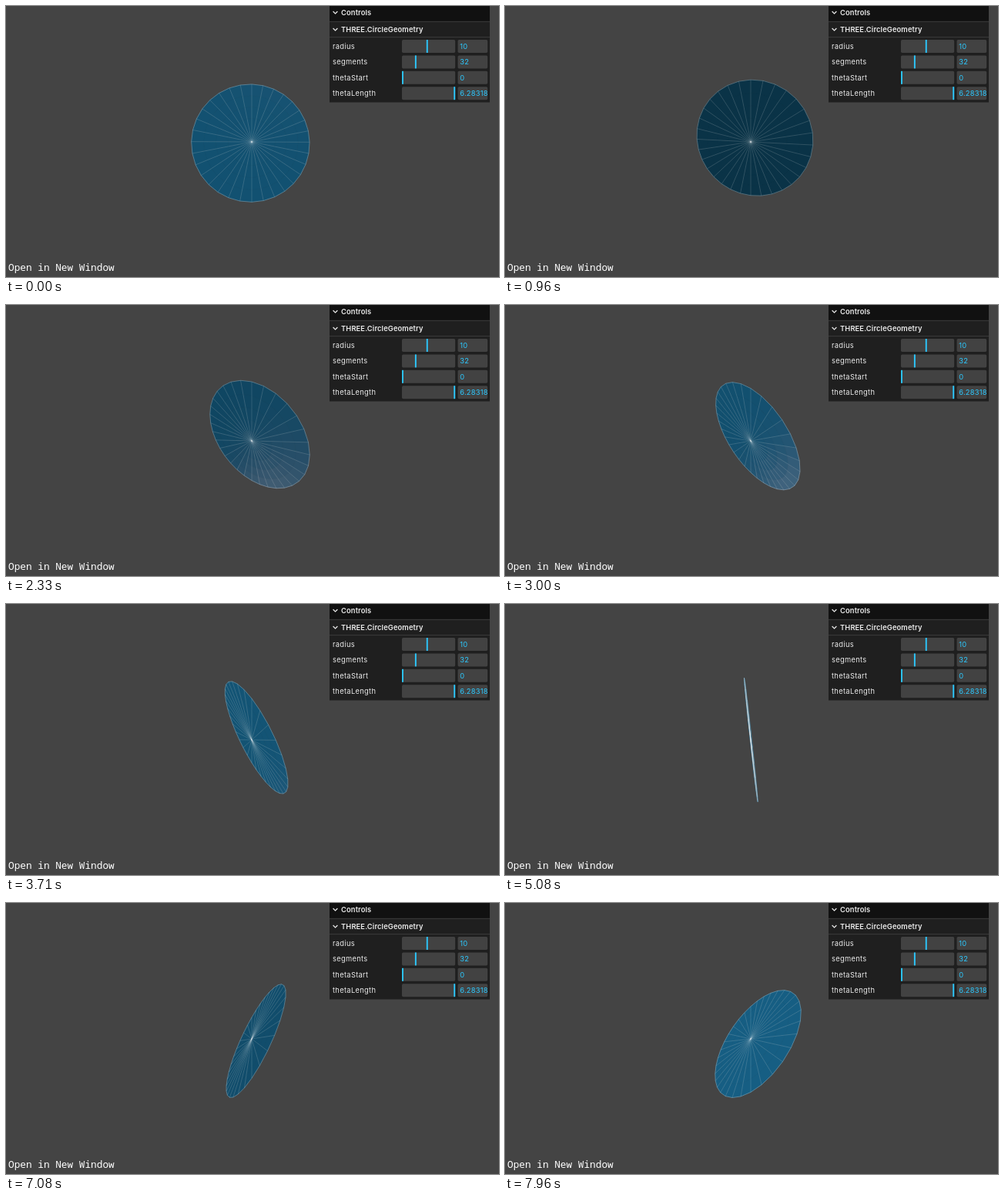
Write an HTML page that moves like this. It is 640 px wide and 353 px high and loops after 8000 ms.

```html
<!DOCTYPE html>
<html lang="en">
<head>
<meta charset="utf-8">
<title>CircleGeometry</title>
<style>
  html, body { margin: 0; width: 100%; height: 100%; overflow: hidden; background: #444; }
  svg { display: block; width: 100vw; height: 100vh; }
  #gui { font: 9.35px Inter, Roboto, sans-serif; letter-spacing: .3px; fill: #ebebeb; }
  #gui .title { font-weight: 600; letter-spacing: .12px; }
  #gui .value { fill: #2cc9ff; letter-spacing: .2px; }
  #link { font: 12.75px "Noto Sans Mono", "DejaVu Sans Mono", monospace; fill: #fff; }
  #faces { stroke-width: .6; stroke-linejoin: round; }
  #spokes, #rim { stroke: #fff; stroke-width: .6; stroke-opacity: .26; }
  #rim { stroke-opacity: .45; }
</style>
</head>
<body>
<svg viewBox="0 0 640 353">
  <rect width="640" height="353" fill="#444"/>
  <g id="faces"></g>
  <g id="spokes"></g>
  <g id="rim"></g>
  <g id="gui">
    <clipPath id="inputs"><rect x="586.5" y="40" width="38.7" height="86"/></clipPath>
    <rect x="420" width="208" height="125.5" fill="#1f1f1f"/>
    <rect x="420" width="208" height="20" fill="#111"/>
    <path d="M420 20.3h208M420 40.6h208" stroke="#424242" stroke-width=".85"/>
    <path d="M424.6 7l2.9 3 2.9-3M424.6 29l2.9 3 2.9-3" fill="none" stroke="#ebebeb" stroke-width="1.2"/>
    <text class="title" x="435" y="12">Controls</text>
    <text class="title" x="435" y="34">THREE.CircleGeometry</text>
  </g>
  <text id="link" x="3" y="345">Open in New Window</text>
</svg>
<script>
const SEGMENTS = 32, RINGS = 5, RADIUS = 10;
const CAMERA = 30, FOCAL = 230.5, CX = 319, CY = 177;
const START = 3.078, SPEED = 0.3, FPS = 24, LOOP = 8000;

const $ = id => document.getElementById(id);
function add(parent, tag, attrs, text) {
  const el = document.createElementNS(parent.namespaceURI, tag);
  for (const k in attrs) el.setAttribute(k, attrs[k]);
  if (text) el.textContent = text;
  return parent.appendChild(el);
}

// Control rows: name, slider handle position, value
[['radius', 545.8, '10'], ['segments', 530.9, '32'],
 ['thetaStart', 514, '0'], ['thetaLength', 581.3, '6.28318']].forEach(([name, handle, value], i) => {
  const gui = $('gui'), y = 44 + i * 20.4;
  const box = (x, width, fill, rx) => add(gui, 'rect', { x, y, width, height: 17, fill, rx });
  add(gui, 'text', { x: 424, y: y + 12 }, name);
  box(514, 69.2, '#424242', 1.7);
  box(handle, 1.9, '#2cc9ff', 0);
  box(586.5, 38.7, '#424242', 1.7);
  add(gui, 'text', { x: 589.3, y: y + 12, class: 'value', 'clip-path': 'url(#inputs)' }, value);
});

const dot = (a, b) => a[0] * b[0] + a[1] * b[1] + a[2] * b[2];
const unit = v => { const l = Math.hypot(...v); return v.map(c => c / l); };
const toLinear = c => ((c / 255 + 0.055) / 1.055) ** 2.4;
const toByte = c => Math.min(255, Math.round(255 * (1.055 * c ** (1 / 2.4) - 0.055)));

const LIGHTS = [[0, 1, 0], [1, 2, 1], [-1, -2, -1]].map(unit);
const DIFFUSE = [0x15, 0x62, 0x89].map(toLinear);
const EMISSIVE = [0x07, 0x25, 0x34].map(toLinear);
const SPECULAR = toLinear(0x11), SHININESS = 30;

// Blinn-Phong colour of a point on the disc
function shade(p, normal) {
  const view = unit([-p[0], -p[1], CAMERA - p[2]]);
  let diffuse = 0, gloss = 0;
  for (const light of LIGHTS) {
    const lit = 3 / Math.PI * Math.max(0, dot(normal, light));
    if (!lit) continue;
    const half = unit(light.map((c, i) => c + view[i]));
    const vh = dot(view, half);
    const fresnel = SPECULAR + (1 - SPECULAR) * 2 ** ((-5.55473 * vh - 6.98316) * vh);
    diffuse += lit;
    gloss += lit * fresnel * (SHININESS / 2 + 1) / 4 * Math.max(0, dot(normal, half)) ** SHININESS;
  }
  return `rgb(${DIFFUSE.map((c, i) => toByte(EMISSIVE[i] + c * diffuse + gloss))})`;
}

const cells = [], spokes = [], rim = [];
for (let i = 0; i < SEGMENTS; i++) {
  for (let j = 0; j < RINGS; j++) cells.push({ i, j, el: add($('faces'), 'polygon') });
  spokes.push(add($('spokes'), 'line'));
  rim.push(add($('rim'), 'line'));
}

function setLine(el, ...coords) {
  ['x1', 'y1', 'x2', 'y2'].forEach((k, n) => el.setAttribute(k, coords[n].toFixed(2)));
}

function draw(time) {
  const angle = START + SPEED * Math.floor((time + 4.9) * FPS / 1000) / FPS;
  const s = Math.sin(angle), c = Math.cos(angle);
  const normal = [s, -s * c, c * c];

  // Equal turns about x and y
  const place = (i, j) => {
    const theta = i / SEGMENTS * 2 * Math.PI, r = RADIUS * j / RINGS;
    const x = r * Math.cos(theta), y = r * Math.sin(theta);
    return [x * c, y * c + x * s * s, y * s - x * s * c];
  };
  const project = ([x, y, z]) => {
    const k = FOCAL / (CAMERA - z);
    return [CX + x * k, CY - y * k];
  };
  const at = (i, j) => project(place(i, j));

  for (const { i, j, el } of cells) {
    const corners = [at(i, j), at(i + 1, j), at(i + 1, j + 1), at(i, j + 1)];
    const color = shade(place(i + 0.5, j + 0.5), normal);
    el.setAttribute('points', corners.map(p => p.map(v => v.toFixed(2))).join(' '));
    el.setAttribute('fill', color);
    el.setAttribute('stroke', color);
  }
  for (let i = 0; i < SEGMENTS; i++) {
    const end = at(i, RINGS);
    setLine(spokes[i], CX, CY, ...end);
    setLine(rim[i], ...end, ...at(i + 1, RINGS));
  }
}

const begin = performance.now();
function tick() {
  draw((performance.now() - begin) % LOOP);
  requestAnimationFrame(tick);
}
tick();
</script>
</body>
</html>
```
